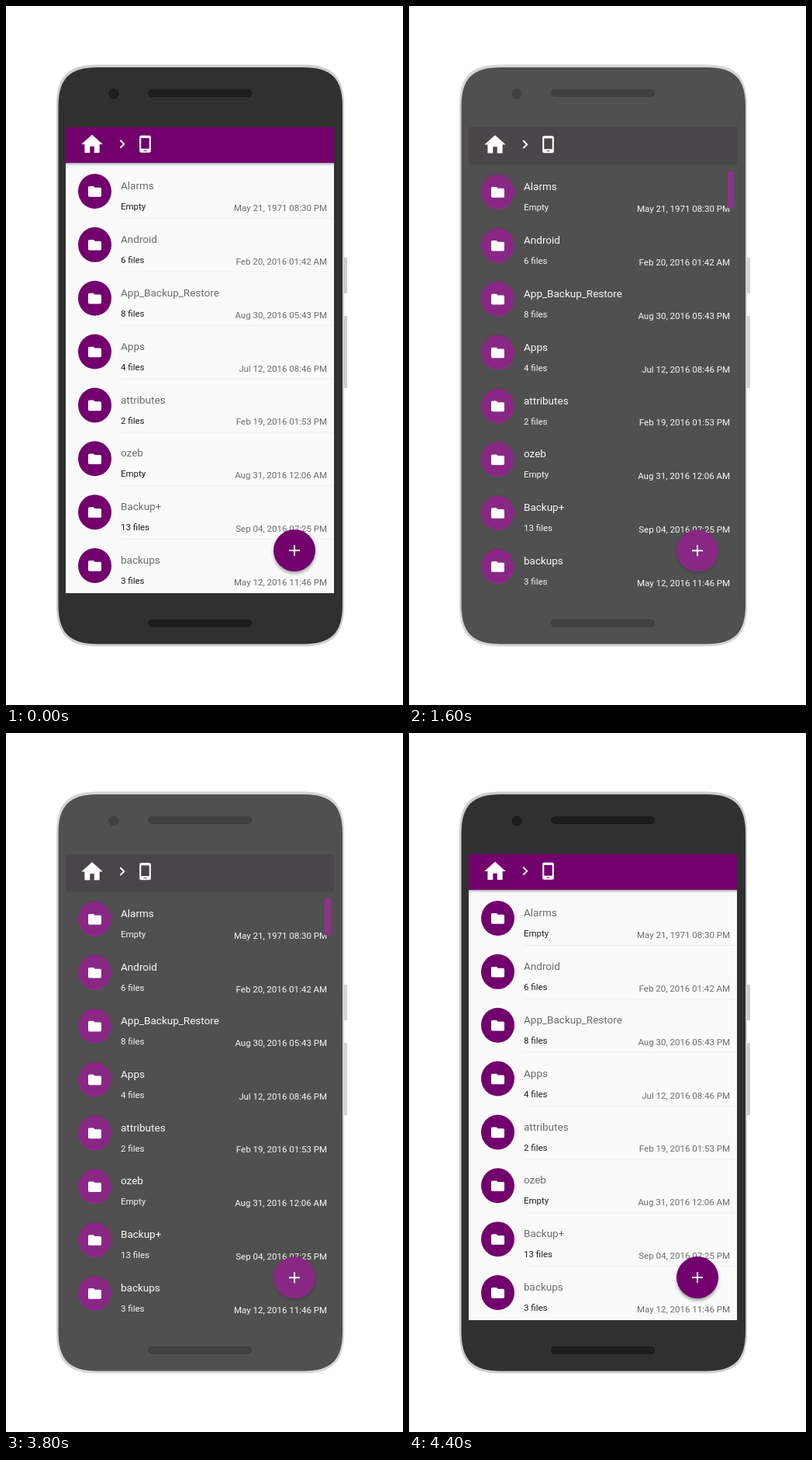
Write an HTML page that moves like this. It is 512x900 px and loops after 5400 ms.

```html
<!DOCTYPE html>
<html lang="en">
<head>
<meta charset="utf-8">
<title>File manager themes</title>
<style>
  html, body { margin: 0; width: 100%; height: 100%; overflow: hidden; background: #fff; }
  svg { display: block; width: 100%; height: 100%; }
  text { font: 11.5px Roboto, sans-serif; }
  .title { font-size: 13.5px; }
  .date { text-anchor: end; }
</style>
</head>
<body>
<svg id="stage" viewBox="0 0 512 900">
  <defs>
    <filter id="blur" x="-30%" y="-30%" width="160%" height="160%">
      <feGaussianBlur stdDeviation="2"/>
    </filter>
    <linearGradient id="barShadow" x2="0" y2="1">
      <stop offset="0" stop-opacity=".28"/>
      <stop offset="1" stop-opacity="0"/>
    </linearGradient>
    <path id="folder" fill="#fff" d="M10 4H4c-1.1 0-2 .9-2 2v12c0 1.1.9 2 2 2h16c1.1 0 2-.9 2-2V8c0-1.1-.9-2-2-2h-8z"/>
    <g id="breadcrumb" fill="#fff">
      <path transform="translate(94.5 161.5) scale(1.375)" d="M10 20v-6h4v6h5v-8h3L12 3 2 12h3v8z"/>
      <path d="M147.3 172.8l4.9 4.9-4.9 4.9" fill="none" stroke="#fff" stroke-width="2"/>
      <path transform="translate(166.9 165.7) scale(1.05 1)" fill-rule="evenodd" d="M17 1H7a2 2 0 0 0-2 2v18a2 2 0 0 0 2 2h10a2 2 0 0 0 2-2V3a2 2 0 0 0-2-2zM14 21h-4v-1h4zM17 18H7V4.3h10z"/>
    </g>
    <g id="phone">
      <g fill="#cecece">
        <rect x="434" y="324" width="6" height="46" rx="1"/>
        <rect x="434" y="399" width="6" height="93" rx="1"/>
        <path id="rim"/>
      </g>
      <path id="case" fill="#303030"/>
      <g fill="#1e1e1e" stroke="#161616">
        <circle cx="139" cy="113" r="6"/>
        <rect x="183.5" y="108" width="133" height="8.5" rx="4.2"/>
        <rect x="183.5" y="790.5" width="133" height="8.5" rx="4.2"/>
      </g>
    </g>
  </defs>
  <g id="light"></g>
  <g id="dark"></g>
</svg>
<script>
const PURPLE = '#72006d';
const ROW_HEIGHT = 68.86;
const folders = [
  ['Alarms', 'Empty', 'May 21, 1971 08:30 PM'],
  ['Android', '6 files', 'Feb 20, 2016 01:42 AM'],
  ['App_Backup_Restore', '8 files', 'Aug 30, 2016 05:43 PM'],
  ['Apps', '4 files', 'Jul 12, 2016 08:46 PM'],
  ['attributes', '2 files', 'Feb 19, 2016 01:53 PM'],
  ['ozeb', 'Empty', 'Aug 31, 2016 12:06 AM'],
  ['Backup+', '13 files', 'Sep 04, 2016 07:25 PM'],
  ['backups', '3 files', 'May 12, 2016 11:46 PM']
];
const themes = {
  light: { screen: '#fafafa', bar: PURPLE, title: '#6c6c6c', count: '#1c1c1c', date: '#6c6c6c',
           divider: '#f0f0f0', shift: 0, shadow: 4 },
  dark: { screen: '#262626', bar: '#242424', title: '#fff', count: '#fff', date: '#fff',
          divider: 'none', shift: 1, shadow: 2, scrollbar: true }
};

// A rectangle whose corners ease into the sides more gently than arcs.
function softRect(left, top, right, bottom, size) {
  const pull = size * 0.72;
  return `M${left + size} ${top}H${right - size}
    c${pull} 0 ${size} ${size - pull} ${size} ${size}V${bottom - size}
    c0 ${pull} ${pull - size} ${size} ${-size} ${size}H${left + size}
    c${-pull} 0 ${-size} ${pull - size} ${-size} ${-size}V${top + size}
    c0 ${-pull} ${size - pull} ${-size} ${size} ${-size}z`;
}
document.getElementById('rim').setAttribute('d', softRect(65, 75.5, 436, 824.5, 53));
document.getElementById('case').setAttribute('d', softRect(67.5, 79, 434, 821.5, 51));

const row = theme => ([name, count, date], i) => `
  <g transform="translate(0 ${238.5 + theme.shift + i * ROW_HEIGHT})">
    <ellipse cx="114.5" rx="21.5" ry="22.5" fill="${PURPLE}"/>
    <use href="#folder" transform="translate(104.3 -9.8) scale(.85)"/>
    <text class="title" x="148" y="-2.4" fill="${theme.title}">${name}</text>
    <text x="148" y="23.6" fill="${theme.count}">${count}</text>
    <text class="date" x="414" y="25.5" fill="${theme.date}">${date}</text>
    ${i < folders.length - 1 ? `<path d="M148 35H423" stroke="${theme.divider}"/>` : ''}
  </g>`;

const screen = theme => `
  <use href="#phone"/>
  <rect x="77" y="156" width="346" height="600" fill="${theme.screen}"/>
  <rect x="77" y="202" width="346" height="4" fill="url(#barShadow)"/>
  <rect x="77" y="156" width="346" height="46" fill="${theme.bar}"/>
  <use href="#breadcrumb" y="${theme.shift / 2}"/>
  ${folders.map(row(theme)).join('')}
  ${theme.scrollbar ? `<rect x="411" y="213" width="8" height="47.5" fill="${PURPLE}"/>` : ''}
  <g transform="translate(372 ${701 + theme.shift / 3})">
    <circle cy="${theme.shadow / 2 + 1}" r="26.5" opacity=".4" filter="url(#blur)"/>
    <circle r="27" fill="${PURPLE}"/>
    <path d="M-7 0H7M0-7V7" stroke="#fff" stroke-width="2"/>
  </g>`;

const layers = {};
for (const name in themes) {
  layers[name] = document.getElementById(name);
  layers[name].innerHTML = screen(themes[name]);
}

// Both layers fade in hard 200 ms steps over the white page.
function darkness(t) {
  if (t < 1000 || t >= 4400) return 0;
  if (t < 1800) return Math.floor((t - 800) / 200) / 5;
  if (t < 3800) return 1;
  return (4 - Math.floor((t - 3800) / 200)) / 5;
}

function draw() {
  const amount = darkness(performance.now() % 5400);
  layers.light.setAttribute('opacity', 1 - amount);
  layers.dark.setAttribute('opacity', amount);
  requestAnimationFrame(draw);
}
draw();
</script>
</body>
</html>
```
